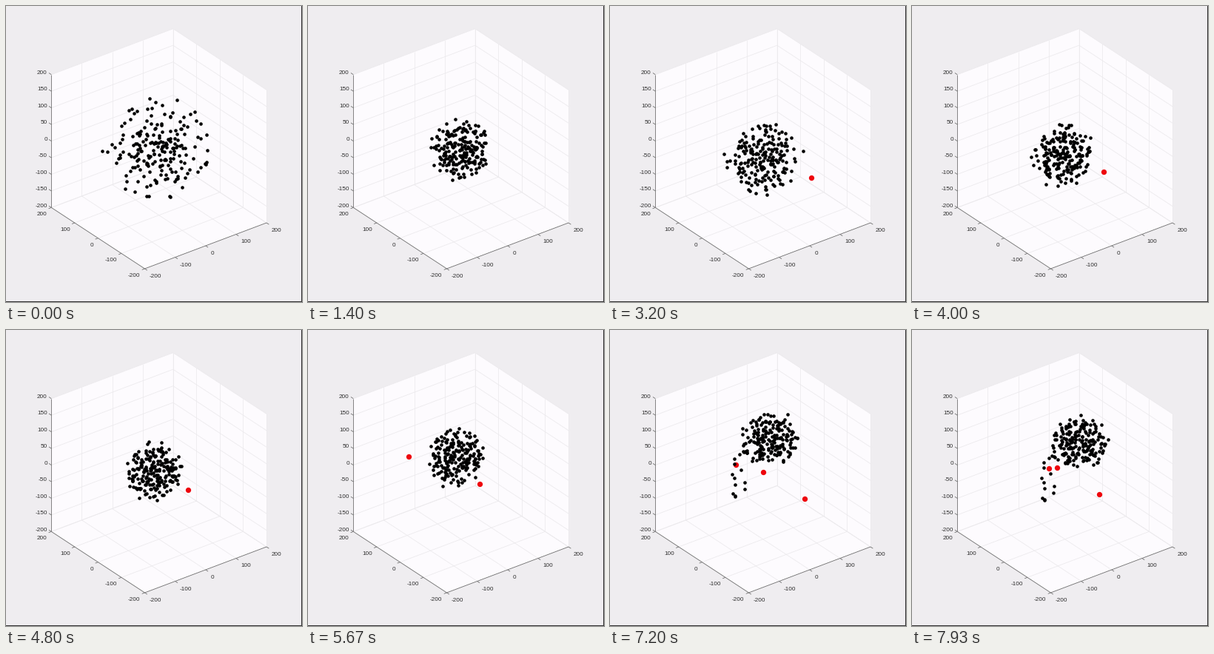
Write a matplotlib script that moves like this. It is 400 px wide and 400 px high and loops after 8000 ms.

```python
import numpy as np
import matplotlib.pyplot as plt
from matplotlib.animation import FuncAnimation

SIZE, DPI, FRAMES, LOOP_MS = 400, 100, 120, 8000
COUNT, STRAGGLERS = 200, 13
PT = 72 / DPI
INK, AXIS, GRID = "#303030", "#6c6c6c", "#eceaed"
plt.rcParams["font.family"] = "Liberation Sans"

fig = plt.figure(figsize=(SIZE / DPI, SIZE / DPI), dpi=DPI, facecolor="#efedf0")
ax = fig.add_axes([0, 0, 1, 1])
ax.set(xlim=(0, SIZE), ylim=(SIZE, 0))
ax.axis("off")

# Orthographic box: front floor corner plus one screen vector per axis.
FRONT = np.array([187.5, 355.0])
EX, EY, EZ = np.array([[164.5, -62.0], [-126.2, -82.6], [0.0, -179.7]])


def project(x, y, z):
    """Map data coordinates in -200..200 to stage pixels."""
    u, v, w = (np.array([x, y, z]) + 200) / 400
    return FRONT + u * EX + v * EY + w * EZ


def line(a, b, color, width=0.8):
    ax.plot(*zip(a, b), color=color, lw=width * PT, solid_capstyle="butt", zorder=1)


def tick(pos, axis, label, shift, align):
    line(pos, pos + axis / np.hypot(*axis) * 4, AXIS)
    ax.text(*(pos + shift), str(label), size=8.2 * PT, color=INK,
            ha=align, va="center_baseline")


def draw_box():
    lo, hi = -200, 200
    floor = [(lo, lo, lo), (hi, lo, lo), (hi, hi, lo), (lo, hi, lo)]
    left = [(lo, hi, lo), (hi, hi, lo), (hi, hi, hi), (lo, hi, hi)]
    right = [(hi, lo, lo), (hi, hi, lo), (hi, hi, hi), (hi, lo, hi)]
    for face in (floor, left, right):
        ax.fill(*np.transpose([project(*c) for c in face]), color="#fdfbfe", lw=0)

    for k in range(lo, hi + 1, 100):
        for a, b in (((k, lo, lo), (k, hi, lo)), ((k, hi, lo), (k, hi, hi)),
                     ((lo, k, lo), (hi, k, lo)), ((hi, k, lo), (hi, k, hi))):
            line(project(*a), project(*b), GRID)
        tick(project(k, lo, lo), -EY, k, (6.5, 9.5), "left")
        tick(project(lo, k, lo), -EX, k, (-6, 8.5), "right")
    for k in range(lo, hi + 1, 50):
        line(project(lo, hi, k), project(hi, hi, k), GRID)
        line(project(hi, hi, k), project(hi, lo, k), GRID)
        tick(project(lo, hi, k), EY, k, (-5.5, -3.2), "right")

    corner = project(lo, hi, lo)
    line(corner, project(lo, hi, hi), AXIS)
    line(corner, FRONT, AXIS)
    line(FRONT, project(hi, lo, lo), AXIS)

    edge = SIZE - 1
    ax.fill([edge, SIZE, SIZE, edge], [0, 0, SIZE, SIZE], color="#333333", lw=0)
    ax.fill([0, SIZE, SIZE, 0], [edge, edge, SIZE, SIZE], color="#333333", lw=0)


def ease(t, start, end):
    k = np.clip((t - start) / (end - start), 0, 1)
    return k * k * (3 - 2 * k)


def bump(t, middle, width):
    return np.exp(-((t - middle) / width) ** 2)


# Evenly spread directions, lowest first, so the stragglers leave from below.
rng = np.random.default_rng(4)
index = np.arange(COUNT)
height = 1 - (2 * index + 1) / COUNT
around = index * np.pi * (3 - np.sqrt(5))
ring = np.sqrt(1 - height ** 2)
depth = rng.permutation((index + 0.5) / COUNT)
phase = rng.uniform(0, 2 * np.pi, (COUNT, 2))
rate = rng.uniform(0.06, 0.16, (COUNT, 2))
trail = np.linspace((-40, 15), (-40, 78), STRAGGLERS)
trail += rng.normal(0, 5.5, trail.shape)


def flock(frame):
    """Gather, swell, then rise away from the intruders and shed a tail."""
    t = max(frame, 1)
    center = np.array([
        207 - 8 * bump(t, 78, 18) + 18 * ease(t, 98, 119),
        194 + 12 * bump(t, 50, 14) - 46 * ease(t, 65, 105) + 6 * ease(t, 105, 119),
    ])
    radius = 39 + 32 * (1 - ease(t, 1, 24)) + 13 * bump(t, 45, 13)
    distance = depth ** (0.36 + 0.005 * (radius - 39))

    turn = around + 0.03 * t
    unit = np.column_stack([ring * np.cos(turn), height]) * distance[:, None]
    wander = 0.1 * np.sin(rate * t + phase)
    points = center + (unit + wander) * radius * (1, 0.96)

    tail = points[:STRAGGLERS]
    tail += (center + trail - tail) * ease(t, 80, 98)
    return points


# Each intruder: first frame, starting point, velocity in pixels per frame.
INTRUDERS = [
    (48, (272, 232), (-1.09, -0.66)),
    (74, (119, 166), (1.51, 0.47)),
    (101, (270, 233), (-1.0, -0.65)),
]


def intruders(frame):
    spots = [np.add(start, np.multiply(velocity, frame - first))
             for first, start, velocity in INTRUDERS if frame >= first]
    return np.reshape(spots, (-1, 2))


draw_box()
red = ax.scatter([], [], s=(7.3 * PT) ** 2, color="#ee040c", lw=0, zorder=3)
black = ax.scatter([], [], s=(4.6 * PT) ** 2, color="black", lw=0, zorder=4)


def update(frame):
    black.set_offsets(flock(frame))
    red.set_offsets(intruders(frame))
    return red, black


anim = FuncAnimation(fig, update, frames=FRAMES, interval=LOOP_MS / FRAMES,
                     init_func=lambda: update(0), repeat=True, repeat_delay=0)
plt.show()
```
